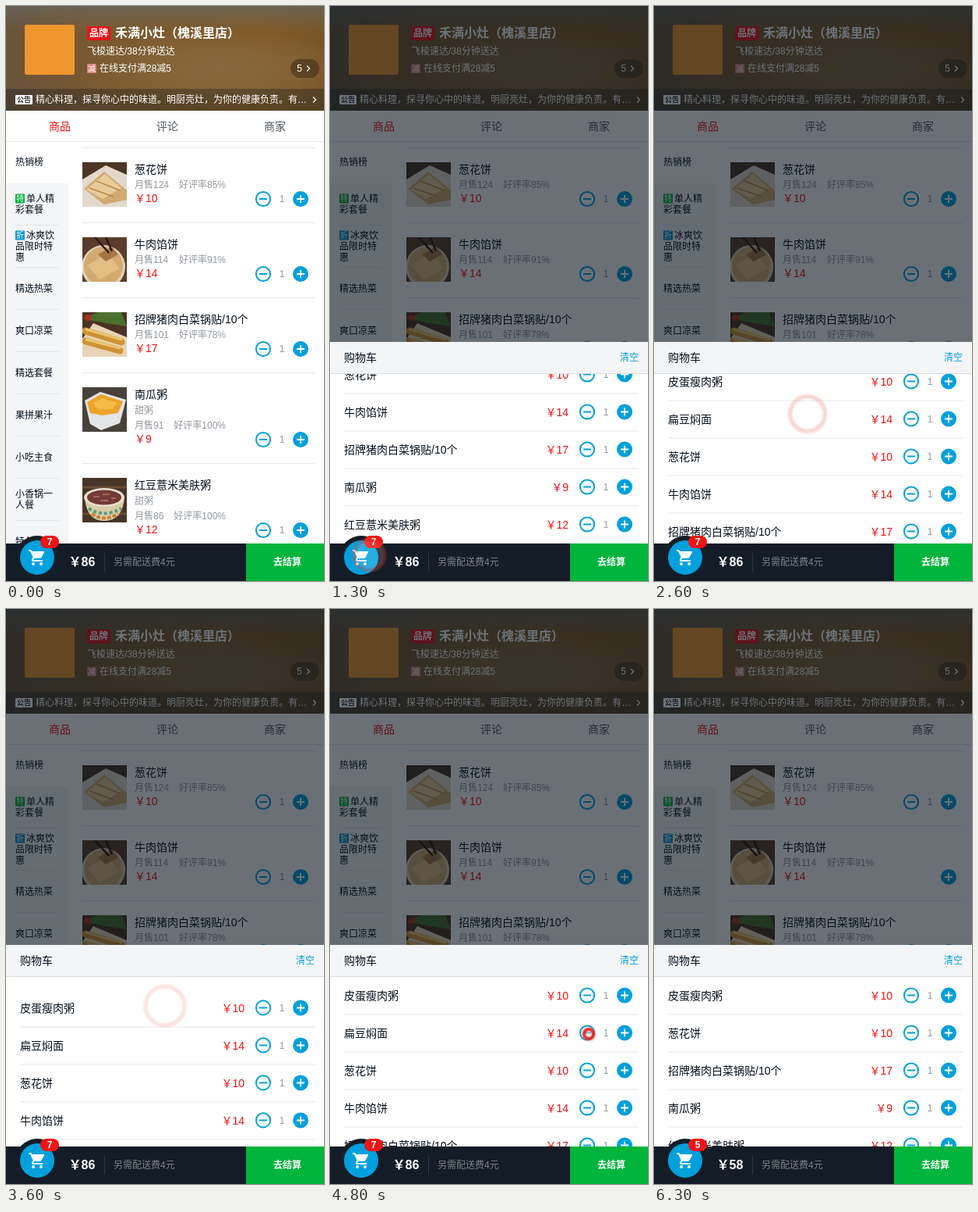
These frames come from a looping animation (408 px wide and 736 px high, 8 s). An HTML page:

```html
<!DOCTYPE html>
<html lang="zh-CN">
<head>
<meta charset="utf-8">
<title>点餐购物车</title>
<style>
html, body { margin: 0; width: 100%; height: 100%; overflow: hidden; background: #fff; }
svg { display: block; width: 408px; height: 736px; }
text {
  font-family: "Liberation Sans", "Noto Sans CJK SC", "Noto Sans CJK", sans-serif;
  white-space: pre;
  text-spacing-trim: space-all;
}
</style>
</head>
<body>
<svg id="stage" viewBox="0 0 408 736" xmlns="http://www.w3.org/2000/svg"></svg>
<script>
const LOOP = 8000;
const INK = '#07111b', GREY = '#93999f', RED = '#f01414', BLUE = '#00a0dc', DARK = '#141d27', LINE = '#e6e8ea', PALE = '#f3f5f7';

// Markup helpers; text is placed by its vertical centre.
const text = (x, y, s, size = 12, fill = INK, more = '') =>
  `<text x="${x}" y="${y + size * 0.37}" font-size="${size}" fill="${fill}" ${more}>${s}</text>`;
const rect = (x, y, w, h, fill, more = '') =>
  `<rect x="${x}" y="${y}" width="${w}" height="${h}" fill="${fill}" ${more}/>`;
const circle = (x, y, r, fill, more = '') => `<circle cx="${x}" cy="${y}" r="${r}" fill="${fill}" ${more}/>`;
const ellipse = (x, y, rx, ry, fill) => `<ellipse cx="${x}" cy="${y}" rx="${rx}" ry="${ry}" fill="${fill}"/>`;
const path = (d, fill, more = '') => `<path d="${d}" fill="${fill}" ${more}/>`;
const stroke = (d, color, width, more = '') => path(d, 'none', `stroke="${color}" stroke-width="${width}" ${more}`);
const group = (attrs, ...parts) => `<g ${attrs}>${parts.join('')}</g>`;
const BOLD = 'font-weight="700"', MID = 'text-anchor="middle"', END = 'text-anchor="end"';

const minus = y => circle(330, y, 9.1, 'none', `stroke="${BLUE}" stroke-width="2"`) + stroke(`M325 ${y}h10`, BLUE, 2);
const plus = y => circle(378, y, 10, BLUE) + stroke(`M373 ${y}h10M378 ${y - 5}v10`, '#fff', 2);
const count = y => text(354, y, 1, 12, GREY, MID);
const chevron = (x, y) => stroke(`M${x - 2} ${y - 3.5}l3.5 3.5l-3.5 3.5`, '#fff', 1.3);
const tag = (x, y, s, fill) => rect(x, y, 12, 12, fill, 'rx="1"') + text(x + 6, y + 6, s, 10, '#fff', MID);

// Simplified dish pictures on a 57 px square.
const dishes = [
  rect(0, 0, 57, 57, '#4a3526') + path('M0 22L30 4L57 16V57H0z', '#e2d9cb') +
    path('M2 34L28 12L57 36V48L28 54z', '#d0aa70') + path('M5 35L29 15L50 33L26 47z', '#e8cb98') +
    stroke('M9 33L40 44M18 24L48 36', '#b88a4c', 1.5),
  rect(0, 0, 57, 57, '#5b3c2a') + circle(27, 38, 28, '#ddd0bb') + circle(27, 37, 25, '#d3aa70') +
    path('M6 36L32 20L48 40L22 54z', '#e2bd84') + path('M20 22L38 12L46 22L30 31z', '#a87645') +
    stroke('M16 0L34 20M30 0L38 18', '#2c1a13', 2.5),
  rect(0, 0, 57, 57, '#4d3222') + path('M0 8L20 0H50L57 18L30 14z', '#48702c') + circle(7, 7, 4, '#b82a1c') +
    path('M0 34L14 14L57 32V57H0z', '#e6d5b4') +
    stroke('M4 24L50 38M4 37L48 49', '#cf9236', 9, 'stroke-linecap="round"') +
    stroke('M5 22L50 35M5 35L48 46', '#ecc56c', 3, 'stroke-linecap="round"'),
  rect(0, 0, 57, 57, '#49423b') + path('M3 17L23 6L56 16L48 46L24 55L10 47z', '#e4e5e6') +
    path('M6 19L24 9L52 18L46 33L26 36L10 33z', '#eda42a') + path('M14 20L25 14L45 20L38 28L19 28z', '#f5bb46'),
  rect(0, 0, 57, 57, '#493527') + stroke('M0 12H57M0 46H57', '#6a4d35', 3) +
    path('M3 25C5 47 14 55 28 55S52 47 54 25z', '#d8cca6') +
    stroke('M8 39Q28 52 50 39', '#5c9a7c', 4, 'stroke-dasharray="4 3"') +
    stroke('M12 46Q28 57 46 46', '#c98340', 4, 'stroke-dasharray="5 2"') +
    ellipse(28, 25, 26, 12, '#e8dfcf') + ellipse(28, 25, 22, 9.5, '#713a35') +
    stroke('M14 24h8M26 21h9M23 29h10M37 26h6', '#a8665a', 2)
];

const foods = [
  { name: '葱花饼', top: 200, sold: 124, rate: 85, price: 10 },
  { name: '牛肉馅饼', top: 296, sold: 114, rate: 91, price: 14, gone: 5900 },
  { name: '招牌猪肉白菜锅贴/10个', top: 392, sold: 101, rate: 78, price: 17 },
  { name: '南瓜粥', top: 488, sold: 91, rate: 100, price: 9, note: '甜粥' },
  { name: '红豆薏米美肤粥', top: 604, sold: 86, rate: 100, price: 12, note: '甜粥' }
];
const cart = [{ name: '皮蛋瘦肉粥', price: 10 }, { name: '扁豆焖面', price: 14, gone: 4900 }, ...foods];

const header = () => group('',
  rect(0, 0, 408, 134, 'url(#warm)'), rect(0, 0, 408, 134, 'url(#glow)'), rect(0, 0, 408, 134, 'url(#shade)'),
  rect(24, 24, 64, 64, '#f0962e', 'rx="2"'),
  rect(104, 26, 30, 18, '#e8141c', 'rx="2"'), text(119, 35, '品牌', 12, '#fff', `${BOLD} ${MID}`),
  text(140, 34.5, '禾满小灶（槐溪里店）', 16, '#fff', BOLD),
  text(104, 57.5, '飞梭速达/38分钟送达', 12, '#fff'),
  tag(104, 74, '减', '#d8837c'), text(120, 79.5, '在线支付满28减5', 12, '#fff'),
  rect(365, 68, 37, 24, '#000', 'rx="12" fill-opacity=".3"'), text(376.5, 80, 5, 12, '#fff', MID), chevron(388, 80),
  rect(0, 106, 408, 28, INK, 'fill-opacity=".3"'),
  rect(12, 114, 22, 12, '#fff', 'rx="1"'), text(23, 120, '公告', 9, '#333', `${BOLD} ${MID}`),
  text(38, 119.5, '精心料理，探寻你心中的味道。明厨亮灶，为你的健康负责。有…', 12, '#fff'), chevron(396, 120));

const tabs = () => rect(0, 134, 408, 40, '#fff') + rect(0, 173, 408, 1, LINE) +
  ['商品', '评论', '商家'].map((s, i) => text(69 + 138 * i, 154, s, 14, i ? '#4d555d' : RED, MID)).join('');

const menu = () => {
  const items = ['热销榜', '单人精|彩套餐', '冰爽饮|品限时特|惠', '精选热菜', '爽口凉菜', '精选套餐', '果拼果汁', '小吃主食', '小香锅一|人餐', '特色粥'];
  const tags = { 1: ['特', '#00b43c'], 2: ['折', '#0a94d0'] };
  return rect(0, 174, 80, 514, PALE) + rect(0, 174, 80, 53, '#fff') + items.map((item, i) => {
    const lines = item.split('|'), mid = 199.5 + 54 * i, first = mid - 7 * (lines.length - 1);
    return (i && i < 9 ? rect(12, 226 + 54 * i, 56, 1, '#e3e6e9') : '') +
      (tags[i] ? tag(12, first - 6, ...tags[i]) : '') +
      lines.map((s, j) => text(tags[i] && !j ? 26 : 12, first + 14 * j, s)).join('');
  }).join('');
};

const goods = () => rect(98, 181, 298, 1, LINE) + foods.map((f, i) => {
  const extra = f.note ? 20 : 0, y = f.top, mid = y + 47 + extra;
  const rateX = 202 + 6.67 * String(f.sold).length;
  return group(`transform="translate(98 ${y})" clip-path="url(#photo)"`, dishes[i]) +
    text(165, y + 9, f.name, 14) + (f.note ? text(165, y + 30, f.note, 12, GREY) : '') +
    text(165, y + 29 + extra, `月售${f.sold}`, 12, GREY) + text(rateX, y + 29 + extra, `好评率${f.rate}%`, 12, GREY) +
    text(165, y + 46 + extra, `￥${f.price}`, 14, RED) +
    (f.gone ? group('id="leaving"', group('id="spin"', minus(mid)), count(mid)) : minus(mid) + count(mid)) + plus(mid) +
    rect(98, y + 77 + extra, 298, 1, LINE);
}).join('');

const panel = () => group('id="panel"',
  rect(0, 430, 408, 258, '#fff'),
  group('clip-path="url(#view)"', group('id="list"', ...cart.map(f => group('class="row"',
    text(18, 24, f.name, 14), text(306, 24, `￥${f.price}`, 14, RED, END),
    minus(24), count(24), plus(24), rect(18, 48, 378, 1, LINE))))),
  rect(0, 430, 408, 40, PALE), rect(0, 470, 408, 1, '#d9dde1'),
  text(18, 450, '购物车', 14), text(396, 450, '清空', 12, BLUE, END));

const trolley = group('transform="translate(28 694)"',
  circle(7, 20, 2, '#fff'), circle(17, 20, 2, '#fff'),
  path('M5.2 4H20Q21.6 4.2 20.9 5.5L17.3 12Q16.7 13 15.5 13H8.1L7 15H19V17H7Q4 16.6 5.2 14L6.6 11.6L3 4H1V2H4.3z', '#fff'));

const bar = () => group('',
  rect(0, 688, 408, 48, DARK), circle(40, 706, 28, DARK), circle(40, 706, 22, BLUE), trolley,
  rect(44, 678, 24, 16, RED, 'rx="8"'), text(56, 686, 7, 12, '#fff', `id="badge" ${BOLD} ${MID}`),
  text(80.5, 711.5, '￥86', 16, '#fff', `id="total" ${BOLD}`), rect(126, 700, 1, 24, '#2f3841'),
  text(138, 711.5, '另需配送费4元', 12, '#7d8389'),
  rect(308, 688, 100, 48, '#00b43c'), text(361, 711.5, '去结算', 12, '#fff', `${BOLD} ${MID}`));

document.getElementById('stage').innerHTML = `<defs>
  <linearGradient id="warm"><stop stop-color="#69533a"/><stop offset=".3" stop-color="#7a5a30"/><stop offset=".8" stop-color="#835a26"/><stop offset="1" stop-color="#785528"/></linearGradient>
  <radialGradient id="glow" cx=".67" cy=".6" r=".4"><stop stop-color="#87683e"/><stop offset=".5" stop-color="#87683e" stop-opacity=".7"/><stop offset="1" stop-color="#87683e" stop-opacity="0"/></radialGradient>
  <linearGradient id="shade" x2="0" y2="1"><stop stop-color="#66645a" stop-opacity=".8"/><stop offset=".25" stop-color="#66645a" stop-opacity="0"/></linearGradient>
  <clipPath id="photo"><rect width="57" height="57"/></clipPath>
  <clipPath id="view"><rect y="471" width="408" height="217"/></clipPath>
  <filter id="soft" x="-50%" y="-50%" width="200%" height="200%"><feGaussianBlur stdDeviation="1.2"/></filter></defs>` +
  rect(0, 0, 408, 736, '#fff') + header() + tabs() + menu() + goods() +
  rect(0, 0, 408, 736, INK, 'id="mask"') + panel() + bar() +
  group('id="ripple"',
    circle(0, 0, 6, '#fff', 'class="ring" fill-opacity=".35" stroke="#e85a50" stroke-opacity=".7" stroke-width="6" filter="url(#soft)"'),
    circle(0, 0, 6, 'none', 'id="core" class="ring" stroke="#e0211c" stroke-width="3.5"'));

const el = id => document.getElementById(id);
const parts = Object.fromEntries(['panel', 'list', 'mask', 'badge', 'total', 'leaving', 'spin', 'ripple', 'core'].map(id => [id, el(id)]));
const rows = [...document.querySelectorAll('.row')], rings = [...document.querySelectorAll('.ring')];

const progress = (t, from, to) => Math.min(1, Math.max(0, (t - from) / (to - from)));
const easeOut = p => 1 - (1 - p) ** 3;
const mix = (a, b, p) => a + (b - a) * p;

// Stops are [time, value], eased out inside each span.
function follow(stops, t) {
  let value = stops[0][1];
  for (let i = 1; i < stops.length; i++)
    if (t >= stops[i - 1][0]) value = mix(stops[i - 1][1], stops[i][1], easeOut(progress(t, stops[i - 1][0], stops[i][0])));
  return value;
}
const scroll = [[1950, -119], [2350, -68], [2620, -14], [3200, -14], [3330, 6], [3600, 16], [4300, 0]];

const touches = [
  { down: 1000, up: 1100, from: [50, 703], to: [50, 703] },
  { down: 1900, up: 2350, from: [200, 480], to: [197, 522] },
  { down: 3200, up: 3310, from: [203, 485], to: [204, 508] },
  { down: 4790, up: 4800, from: [332, 544], to: [332, 544] },
  { down: 5790, up: 5800, from: [332, 591], to: [332, 591] }
];

function drawTouch(t) {
  const touch = touches.find(k => t >= k.down && t < k.up + 400);
  parts.ripple.setAttribute('visibility', touch ? 'visible' : 'hidden');
  if (!touch) return;
  const p = easeOut(progress(t, touch.down, touch.up)), fade = progress(t, touch.up, touch.up + 400);
  const [x, y] = touch.from.map((v, i) => mix(v, touch.to[i], p));
  parts.ripple.setAttribute('transform', `translate(${x} ${y})`);
  parts.ripple.setAttribute('opacity', 0.9 * (1 - fade) ** 1.1);
  parts.core.setAttribute('opacity', (1 - fade) ** 2);
  rings.forEach(r => r.setAttribute('r', 6 + 26 * fade));
}

function render(t) {
  const shown = easeOut(progress(t, 1150, 1300));
  parts.mask.setAttribute('opacity', 0.6 * shown);
  parts.panel.setAttribute('transform', `translate(0 ${258 * (1 - shown)})`);
  parts.panel.setAttribute('visibility', shown ? 'visible' : 'hidden');
  parts.list.setAttribute('transform', `translate(0 ${470.5 + follow(scroll, t)})`);

  let amount = 0, sum = 0;
  cart.forEach((f, i) => {
    const kept = !(t >= f.gone);
    rows[i].setAttribute('display', kept ? 'inline' : 'none');
    if (!kept) return;
    rows[i].setAttribute('transform', `translate(0 ${48 * amount++})`);
    sum += f.price;
  });
  parts.badge.textContent = amount;
  parts.total.textContent = `￥${sum}`;

  const away = progress(t, 5900, 6300);
  parts.leaving.setAttribute('opacity', 1 - away);
  parts.spin.setAttribute('transform', `translate(${24 * away} 0) rotate(${180 * away} 330 343)`);
  drawTouch(t);
}

const start = performance.now();
function tick() {
  render((performance.now() - start) % LOOP);
  requestAnimationFrame(tick);
}
tick();
</script>
</body>
</html>
```
